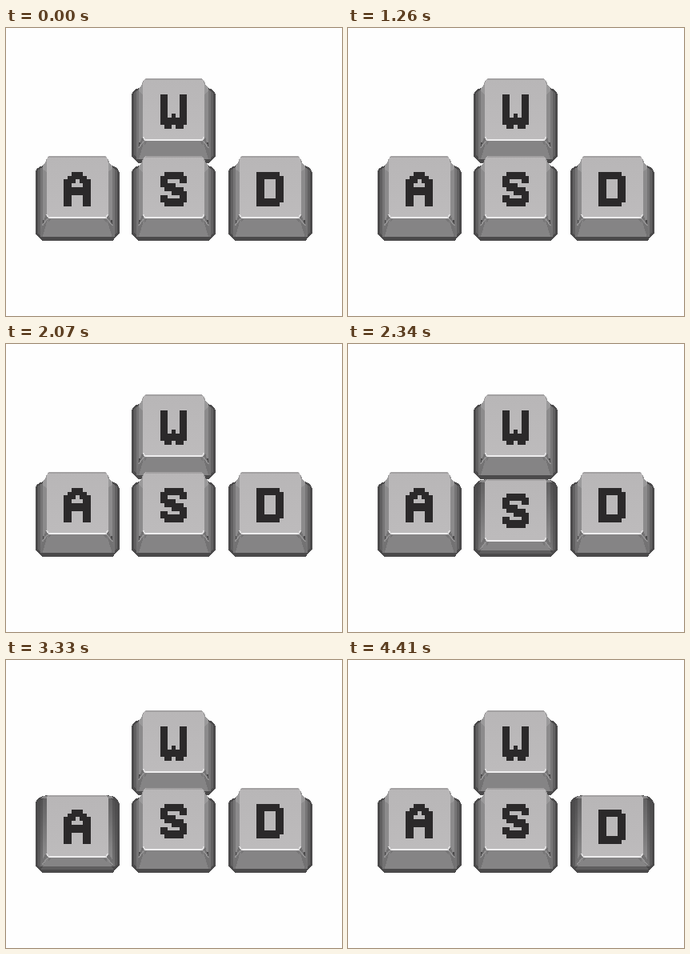
An HTML page that plays this animation: 420x360 px, repeating every 4500 ms.

```html
<!DOCTYPE html>
<html lang="en">
<head>
<meta charset="utf-8">
<title>WASD keys</title>
<style>
  html, body { margin: 0; width: 100%; height: 100%; overflow: hidden; background: #fefefe; }
  svg { display: block; width: 100%; height: 100%; }
</style>
</head>
<body>
<svg id="stage" viewBox="0 0 420 360" shape-rendering="crispEdges"></svg>
<script>
const LOOP = 4500;
const STEP = 90;
const HOLD = 630;
const TRAVEL = 9;
const LETTER_TRAVEL = 7;
const WIDTH = 105;
const DOT = 4.8;

const GLYPHS = {
  W: ['XX...XX', 'XX...XX', 'XX...XX', 'XX...XX', 'XX...XX', 'XX.X.XX', 'XXXXXXX', 'XXXXXXX', '.XX.XX.'],
  A: ['..XXX..', '.XXXXX.', 'XXX.XXX', 'XX...XX', 'XXXXXXX', 'XXXXXXX', 'XX...XX', 'XX...XX', 'XX...XX'],
  S: ['.XXXXX.', 'XXXXXXX', 'XX...XX', 'XXXX...', '.XXXXX.', '...XXXX', 'XX...XX', 'XXXXXXX', '.XXXXX.'],
  D: ['XXXXXX.', 'XXXXXXX', 'XX...XX', 'XX...XX', 'XX...XX', 'XX...XX', 'XX...XX', 'XXXXXXX', 'XXXXXX.']
};

// Upper key first, so the lower row overlaps it.
const KEYS = [
  { name: 'W', x: 157, y: 63, presses: [630, 1440] },
  { name: 'A', x: 36.6, y: 160, presses: [3060] },
  { name: 'S', x: 157, y: 160, presses: [2250] },
  { name: 'D', x: 277.6, y: 160, presses: [3870] }
];

const stage = document.getElementById('stage');

function add(parent, tag, attrs) {
  const el = document.createElementNS('http://www.w3.org/2000/svg', tag);
  for (const k in attrs) el.setAttribute(k, attrs[k]);
  parent.appendChild(el);
  return el;
}

function poly(parent, pts, fill) {
  add(parent, 'polygon', { points: pts.map(p => p.join()).join(' '), fill });
}

const flip = pts => pts.map(([x, y]) => [WIDTH - x, y]);

// Closes a left outline with its mirror image.
const whole = pts => pts.concat(flip(pts).reverse());

function pair(parent, pts, fill) {
  poly(parent, pts, fill);
  poly(parent, flip(pts), fill);
}

function bar(x0, x1, y0, y1) {
  return [[x0, y0], [x1, y0], [x1, y1], [x0, y1]];
}

function gradient(id, from, to) {
  const el = add(defs, 'linearGradient', { id, x1: 0, y1: 0, x2: 0, y2: 1 });
  add(el, 'stop', { offset: 0, 'stop-color': from });
  add(el, 'stop', { offset: 1, 'stop-color': to });
}

function glyph(parent, name, top) {
  let d = '';
  GLYPHS[name].forEach((row, r) => {
    for (const m of row.matchAll(/X+/g)) {
      const x = 35.7 + m.index * DOT;
      const y = top + 19.7 + r * DOT;
      d += `M${x} ${y}h${m[0].length * DOT}v${DOT + 0.1}h${-m[0].length * DOT}z`;
    }
  });
  add(parent, 'path', { d, fill: '#2b292a' });
}

function drawKey(parent, name, down) {
  const t = down ? TRAVEL : 0;
  const edge = t + 75.5;
  const foot = down ? 98 : 101;
  const g = add(parent, 'g', {});
  const shoulder = down
    ? [[16, 9], [9, 10], [5, 12], [2, 15], [0, 19]]
    : [[14, 8], [10, 12], [6, 13], [2, 16], [0, 20]];

  // Base and side walls
  poly(g, whole([...shoulder, [0, 97], [8, 105.5], [11, 106]]), '#4b4a4b');
  pair(g, [[3, 18], [6, 16], [6, 99], [3, 96]], down ? 'url(#wallOuter)' : '#626162');
  pair(g, [[6, 16], [9, 14], [9, foot], [6, foot]], down ? 'url(#wallMid)' : '#767576');
  pair(g, [[9, 14], [14, 12], [14, edge + 4], [9, edge + 4]], down ? 'url(#wallInner)' : '#8c8b8c');

  // Cap top
  if (down) {
    pair(g, [[17, 9], [9, 10.5], [7, 13], [17, 13]], '#8a898a');
    poly(g, whole([[17, t], [14, 12], [14, edge], [52, edge]]), 'url(#face)');
  } else {
    pair(g, [[17, 0], [14, 4], [12, 9], [9, 12], [9, 16], [14, 20]], '#9a999a');
    poly(g, whole([[17, 0], [15, 3], [14, 8], [14, edge], [52, edge]]), 'url(#face)');
  }
  poly(g, whole([[18, t], [16, t + 2]]), '#a3a1a2');

  // Front slope
  if (down) poly(g, whole([[10, 97], [7, 102]]), '#5f5e5f');
  poly(g, whole([[15, edge], [7, foot - 3], [9, foot]]), '#858485');
  pair(g, [[13, edge - 2], [16, edge + 2], [9, foot], [6, foot - 4]], '#737273');
  pair(g, [[15, edge + 2], [17, edge + 2], [10, edge + 11], [8, edge + 11]], '#939293');
  pair(g, [[16, edge + 3], [20, edge + 3], [16, edge + 8]], '#767576');
  poly(g, whole([[17, edge], [17, edge + 2.2]]), '#eeedee');
  pair(g, [[13, edge - 3], [15, edge - 3], [18, edge + 2], [16, edge + 2]], '#dddcdd');

  glyph(g, name, down ? LETTER_TRAVEL : 0);
  return g;
}

const defs = add(stage, 'defs', {});
gradient('face', '#b8b6b7', '#bdbbbc');
gradient('wallOuter', '#4d4c4d', '#5e5d5e');
gradient('wallMid', '#525152', '#737273');
gradient('wallInner', '#626162', '#8c8b8c');

for (const key of KEYS) {
  const g = add(stage, 'g', { transform: `translate(${key.x} ${key.y})` });
  key.up = drawKey(g, key.name, false);
  key.down = drawKey(g, key.name, true);
}

function render(ms) {
  const t = Math.floor((ms % LOOP) / STEP) * STEP;
  for (const key of KEYS) {
    const pressed = key.presses.some(p => t >= p && t < p + HOLD);
    key.up.style.display = pressed ? 'none' : '';
    key.down.style.display = pressed ? '' : 'none';
  }
}

const start = performance.now();
function tick() {
  render(performance.now() - start);
  requestAnimationFrame(tick);
}
tick();
</script>
</body>
</html>
```
